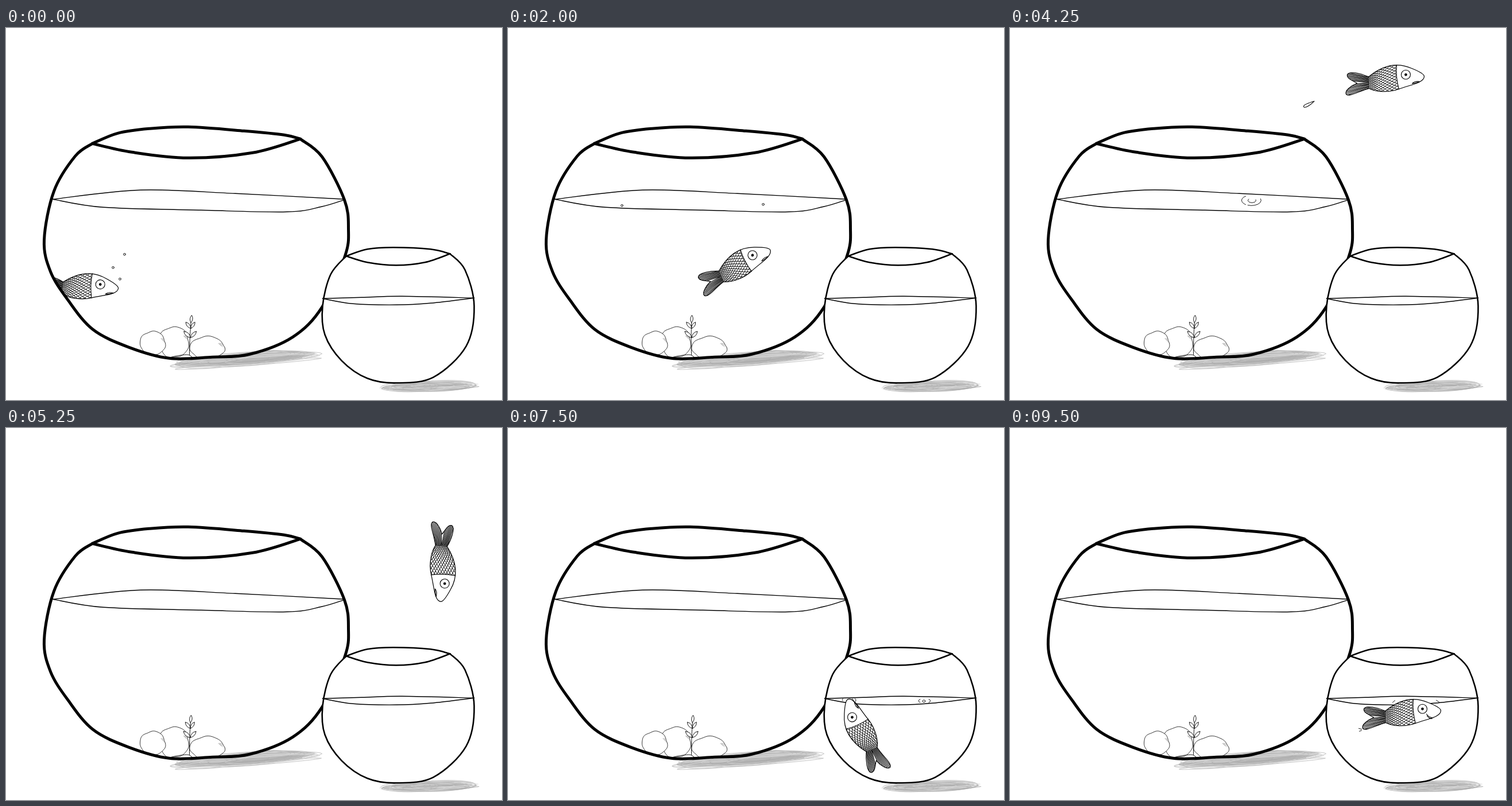
An HTML page with a canvas for the animation above (9.75 s loop, 864 px wide and 648 px high).

```html
<!DOCTYPE html>
<html lang="en">
<head>
<meta charset="utf-8">
<title>Two fish bowls</title>
<style>
html, body { margin: 0; width: 100%; height: 100%; overflow: hidden; background: #fff; }
canvas { display: block; width: 864px; height: 648px; }
</style>
</head>
<body>
<canvas id="stage" width="864" height="648"></canvas>
<script>
const ctx = document.getElementById('stage').getContext('2d');
const STEP = 250, COUNT = 39, TAU = Math.PI * 2;

// Smooth path through a few "x,y x,y ..." points
function curve(text) {
  const p = text.split(' ').map(s => s.split(',').map(Number));
  const at = i => p[Math.max(0, Math.min(p.length - 1, i))];
  const path = new Path2D();
  path.moveTo(...p[0]);
  for (let i = 0; i < p.length - 1; i++) {
    const [a, b, c, d] = [at(i - 1), at(i), at(i + 1), at(i + 2)];
    path.bezierCurveTo(b[0] + (c[0] - a[0]) / 6, b[1] + (c[1] - a[1]) / 6,
      c[0] - (d[0] - b[0]) / 6, c[1] - (d[1] - b[1]) / 6, c[0], c[1]);
  }
  return path;
}

function ink(path, width, fill, color = '#000') {
  if (fill) { ctx.fillStyle = fill; ctx.fill(path); }
  ctx.lineWidth = width;
  ctx.strokeStyle = color;
  ctx.stroke(path);
}

function clipped(shape, draw) {
  ctx.save();
  ctx.clip(shape);
  draw();
  ctx.restore();
}

const big = {
  line: 5,
  wall: curve('151,202 121,224 84,285 67,370 78,425 108,474 152,526 215,557 285,576 360,574 425,569 500,539 551,487 591,398 597,350 590,300 551,225 513,194'),
  back: curve('151,202 195,184 250,176 318,173 415,180 485,187 513,194'),
  front: curve('151,202 220,217 318,227 430,218 513,194'),
  water: [curve('82,299 235,283 400,289 590,299'), curve('82,299 170,313 340,318 490,321 550,312 590,300')]
};
const small = {
  line: 2.6,
  wall: curve('593,398 566,430 552,485 556,535 585,580 630,611 680,619 745,609 802,555 816,485 800,422 774,394'),
  back: curve('593,398 630,386 675,383 740,386 774,394'),
  front: curve('593,398 630,409 680,414 730,409 774,394'),
  water: [curve('552,472 620,470 690,468 816,471'), curve('552,472 605,481 680,483 740,480 816,471')]
};

function bowlBack(b) {
  ink(b.back, b.line);
  b.water.forEach(w => ink(w, 1.4));
}
function bowlFront(b) {
  ink(b.wall, b.line);
  ink(b.front, b.line);
}

function drawStone(x, y, rx, ry) {
  const stone = new Path2D();
  for (let a = 0; a < TAU; a += 0.1) {
    const r = 1 + 0.035 * Math.cos(4 * a + x) + 0.02 * Math.sin(7 * a);
    stone.lineTo(x + rx * r * Math.cos(a), y + ry * r * Math.sin(a));
  }
  stone.closePath();
  ink(stone, 0.9, '#fff', '#222');
  const hatch = new Path2D();
  for (let k = 0; k < 4; k++) {
    hatch.moveTo(x + rx * 0.65 + k, y - ry * 0.4 + k);
    hatch.lineTo(x + rx * 0.9, y - ry * 0.4 + k * 2);
  }
  ink(hatch, 0.6, null, '#999');
}

function drawLeaf(x, y, u, v) {
  const mx = (x + u) / 2, my = (y + v) / 2, nx = (v - y) * 0.36, ny = (x - u) * 0.36;
  const leaf = new Path2D();
  leaf.moveTo(x, y);
  leaf.quadraticCurveTo(mx + nx, my + ny, u, v);
  leaf.quadraticCurveTo(mx - nx, my - ny, x, y);
  ink(leaf, 0.9, '#fff');
}

function drawPlant(sway) {
  ctx.save();
  ctx.translate(320, 570);
  ctx.transform(1, 0, -sway / 68, 1, 0, 0);
  ink(curve('0,0 0,-30 1,-56'), 0.9);
  for (let k = 0; k < 4; k++) {
    const side = k % 2 ? 1 : -1, pair = k >> 1, y = -30 - 16 * pair;
    drawLeaf(1, y, side * (11 - 3 * pair), y - 11);
  }
  drawLeaf(1, -56, 2, -69);
  ctx.restore();
}

function drawShadow(x, y, rx, ry, turn, seed) {
  const rnd = () => (seed = seed * 16807 % 2147483647) / 2147483647;
  const ring = (cx, cy, w, h) => {
    const p = new Path2D();
    p.ellipse(cx, cy, w, h, 0, 0, TAU);
    return p;
  };
  ctx.save();
  ctx.translate(x, y);
  ctx.rotate(turn);
  ctx.fillStyle = '#bdbdbd';
  ctx.fill(ring(-rx * 0.04, 0, rx * 0.9, ry * 0.68));
  for (let k = 0; k < 22; k++) {
    const w = rx * (0.35 + rnd() * 0.6), h = ry * (0.25 + rnd() * 0.65);
    ink(ring((rnd() * 2 - 1) * (rx - w), (rnd() * 2 - 1) * (ry - h), w, h), 0.7, null, k % 3 ? '#adadad' : '#dcdcdc');
  }
  ctx.restore();
}

// The fish faces right around its own centre
const body = new Path2D('M-30 -4 C-6 -24 20 -30 45 -19 C60 -13 67 -9 67 -5 C67 6 45 9 23 17 C5 24 -18 22 -29 16');
const tail = new Path2D('M-29 -4 C-42 -10 -64 -15 -67 -8 C-68 -1 -58 2 -50 7 C-60 11 -72 20 -69 26 C-64 32 -46 20 -29 16 Z');
const divider = new Path2D('M19 -25 Q17 -4 23 17.5');
const coat = new Path2D('M19 -26 Q17 -4 23 19 V30 H-40 V-30 H19 Z');
const sad = new Path2D('M46 7.5 Q50 3 59 4 M46 7.5 Q52 7 57 5');
const smile = new Path2D('M42 1 Q46 7 54 7.5 M43 4 Q47 9 52 9');

// Columns of scales shrink toward the tail
const scales = new Path2D();
for (let x = 26, col = 0; x > -32; col++) {
  const u = (x + 31) / 54;
  const half = 9.5 + 13 * Math.sin(Math.min(1, u * 1.15) * Math.PI / 2);
  const dy = half * 2 / 9, dx = 2.6 + 2 * u;
  for (let r = -5; r <= 5; r++) {
    const y = 6 - 9 * u + (r + (col % 2) / 2) * dy;
    scales.moveTo(x, y - dy / 2);
    scales.bezierCurveTo(x - dx * 1.5, y - dy / 2, x - dx * 1.5, y + dy / 2, x, y + dy / 2);
  }
  x -= dx;
}

// One fan of rays for each tail lobe
const rays = new Path2D();
for (let v = 0; v <= 1; v += 0.14) {
  rays.moveTo(-28, -4 + v * 10);
  rays.quadraticCurveTo(-48, -8 + v * 12, -69, -12 + v * 15);
  rays.moveTo(-28, 6 + v * 10);
  rays.quadraticCurveTo(-48, 7 + v * 13, -72, 12 + v * 18);
}

function drawFish([x, y, deg], happy) {
  ctx.save();
  ctx.translate(x, y);
  ctx.rotate(deg * Math.PI / 180);
  ink(tail, 1.2, '#fff');
  clipped(tail, () => ink(rays, 1.1));
  ink(body, 1.2, '#fff');
  clipped(body, () => clipped(coat, () => ink(scales, 0.8)));
  ink(divider, 1.1);
  for (const [r, fill] of [[8, '#fff'], [1.8, '#000']]) {
    const eye = new Path2D();
    eye.arc(35, -8, r, 0, TAU);
    ink(eye, 1.1, fill);
  }
  ink(happy ? smile : sad, 1.1);
  ctx.restore();
}

// Key poses: step, x, y, degrees
const keys = [
  [0, 129, 451, 7], [5, 243, 443, -8], [8, 397, 417, -22], [10, 425, 326, -68],
  [12, 433, 229, -78], [15, 548, 108, -28], [17, 655, 90, 0], [19, 728, 130, 50],
  [21, 761, 236, 97], [25, 735, 456, 112], [27, 690, 548, 132], [30, 619, 535, 251],
  [35, 682, 500, 356], [38, 684, 498, 360]
];

// Hermite spline through the key poses
function pose(t) {
  const last = keys.length - 1;
  let k = 0;
  while (k < last - 1 && t >= keys[k + 1][0]) k++;
  const a = keys[k], b = keys[k + 1], span = b[0] - a[0], u = (t - a[0]) / span;
  const slope = (i, c) => {
    const p = keys[Math.max(0, i - 1)], q = keys[Math.min(last, i + 1)];
    return (q[c] - p[c]) / (q[0] - p[0]) * span;
  };
  const s = u * u * (3 - 2 * u);
  return [1, 2, 3].map(c => a[c] + (b[c] - a[c]) * s
    + slope(k, c) * u * (1 - u) ** 2 - slope(k + 1, c) * u * u * (1 - u));
}

function drawDrop(x, y, angle, length, width) {
  ctx.save();
  ctx.translate(x, y);
  ctx.rotate(angle);
  const h = length / 2, p = new Path2D();
  p.moveTo(-h, 0);
  p.bezierCurveTo(0, -width, h, -width, h, 0);
  p.bezierCurveTo(h, width, 0, width * 0.6, -h, 0);
  ink(p, 1);
  ctx.restore();
}

const ring = [[-38, -37], [36, -37], [-34, 13], [37, 9], [25, 39]];

function splash(x, y, size) {
  for (const [dx, dy] of ring)
    drawDrop(x + dx * size, y + dy * size, Math.atan2(22, dx), 16, 5);
}

function drawDrops(i) {
  if (i > 10 && i < 14) splash(433, 235 + (i - 12) * 8, 1 + (i - 12) * 0.2);
  if (i > 24 && i < 27) splash(738, 420, i === 25 ? 0.8 : 1.15);
  if (i > 13 && i < 18) {
    const [x, y] = pose(i - 2.6);
    drawDrop(x, y + 6, 2.65, 21, 3.5);
  }
}

// x, y, first step; each rises until it meets the surface
const bubbles = [[207, 395, 0], [187, 418, 0], [199, 438, 0], [445, 340, 6]];

function drawBubbles(i) {
  for (const [x, y, born] of bubbles) {
    const top = y - (i - born) * 16;
    if (i < born || top < 304) continue;
    const b = new Path2D();
    b.arc(x, top, 1.8, 0, TAU);
    ink(b, 1);
  }
}

function drawArc(x, y, rx, ry, from, to) {
  const p = new Path2D();
  p.ellipse(x, y, rx, ry, 0, from * Math.PI, to * Math.PI);
  ink(p, 0.9);
}

function drawBigRipple(i) {
  if (i < 13 || i > 18) return;
  const s = 0.6 + (i - 13) * 0.1;
  drawArc(421, 301, 17 * s, 9 * s, -0.1, 0.62);
  drawArc(421, 301, 17 * s, 9 * s, 0.7, 1.3);
  drawArc(422, 301, 7 * s, 4 * s, -0.1, 1.2);
}

function drawSmallRipple(i) {
  if (i < 27 || i > 31) return;
  const w = 7 + (i - 27) * 1.2;
  drawArc(725, 476.5, 2.4, 2, 0, 2);
  drawArc(726, 476, w, 4, -0.25, 0.25);
  drawArc(726, 476, w, 4, 0.75, 1.25);
}

const noseMarks = new Path2D('M584 472 Q581 474 584 476 M600 472 Q603 474 602 477 M605 472 Q608 474 606 477');
const calmMarks = new Path2D('M667 479 Q669 476 671 475.5 M743 475 L748 478 M608 524 L613 525.5 M609 529 L613 527.5');

function draw(i) {
  ctx.fillStyle = '#fff';
  ctx.fillRect(0, 0, 864, 648);
  ctx.lineCap = ctx.lineJoin = 'round';
  const fish = () => drawFish(pose(i), i > 33);
  const landed = i >= 20;

  ctx.save();
  ctx.translate(-0.5, -0.7);
  drawShadow(422, 577, 137, 12, -0.075, 77);
  drawShadow(738, 625, 88, 10, -0.03, 421);

  bowlBack(big);
  clipped(big.wall, () => {
    drawStone(293, 548, 26, 27);
    drawStone(256, 550, 22, 21);
    drawStone(351, 558, 30, 20);
  });
  ink(curve('288,574 303,571 318,570 326,575'), 0.9);
  drawPlant(i < 17 ? 2 * Math.cos(i * TAU / 6) : 1);
  drawBigRipple(i);
  if (i < 3) clipped(big.wall, fish);
  else if (!landed) fish();
  bowlFront(big);

  ctx.fillStyle = '#fff';
  ctx.fill(small.wall);
  bowlBack(small);
  drawSmallRipple(i);
  if (landed) fish();
  if (i === 30) ink(noseMarks, 0.9);
  if (i > 34) ink(calmMarks, 0.9);
  bowlFront(small);

  drawBubbles(i);
  drawDrops(i);
  ctx.restore();
}

let start = null, shown = -1;
function tick(now) {
  if (start === null) start = now;
  const i = Math.floor((now - start) / STEP) % COUNT;
  if (i !== shown) draw(shown = i);
  requestAnimationFrame(tick);
}
draw(0);
requestAnimationFrame(tick);
</script>
</body>
</html>
```
